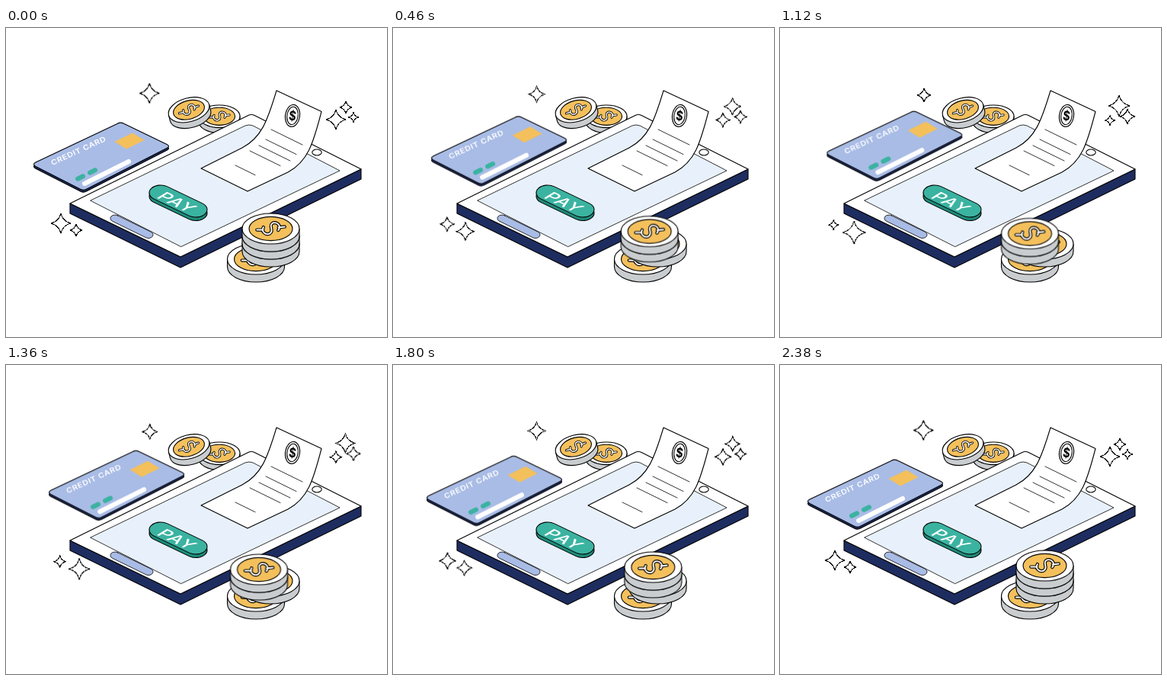
Recreate the animation shown at these times as an HTML page. Size 500 px wide and 405 px high, loop 2400 ms.

```html
<!DOCTYPE html>
<html lang="en">
<head>
<meta charset="utf-8">
<title>Mobile payment</title>
<style>
  html, body { margin: 0; width: 100%; height: 100%; overflow: hidden; background: #fff; }
  svg { display: block; width: 500px; height: 405px; }
  .ink { stroke: #000; stroke-width: 1.1; stroke-linejoin: round; stroke-linecap: round; }
  .thin .ink { stroke-width: .8; }
  .sparkle { fill: #fff; vector-effect: non-scaling-stroke; shape-rendering: crispEdges; }
  text { font-family: Inter, "Open Sans", sans-serif; font-weight: 600; fill: #fff; }
</style>
</head>
<body>
<svg id="stage" viewBox="0 0 500 405"></svg>
<script>
const NAVY = '#1e2d60', BLUE = '#a9bce6', GOLD = '#f3c05c', GREY = '#c9cdd0',
      TEAL = '#3bb3a1', DEEP_TEAL = '#1f8a79', SCREEN = '#e8f1fb';

const path = (d, fill = 'none') => `<path class="ink" d="${d}" fill="${fill}"/>`;
const ellipse = (x, y, rx, ry, fill = '#fff') =>
  `<ellipse class="ink" cx="${x}" cy="${y}" rx="${rx}" ry="${ry}" fill="${fill}"/>`;
const group = (body, attrs) => `<g ${attrs}>${body}</g>`;
const bar = (x1, y1, x2, y2, width, color) =>
  `<path d="M${x1} ${y1}L${x2} ${y2}" stroke="${color}" stroke-width="${width}" stroke-linecap="round"/>`;

// Outline around two equal ellipses joined by straight sides.
function pill(x1, y1, x2, y2, rx, ry, fill) {
  const u = (x2 - x1) / rx, v = (y2 - y1) / ry, len = Math.hypot(u, v);
  const dx = rx * v / len, dy = -ry * u / len;
  return path(`M${x1 + dx} ${y1 + dy}L${x2 + dx} ${y2 + dy}
    A${rx} ${ry} 0 0 1 ${x2 - dx} ${y2 - dy}L${x1 - dx} ${y1 - dy}
    A${rx} ${ry} 0 0 1 ${x1 + dx} ${y1 + dy}Z`, fill);
}

const DOLLAR = 'M-18 1.5L-10 1.5M-9.5 -2C-13 4 -6 9 -1 6C5 2 -4 -4 3 -7.5C9 -9 14 -3 9.5 2M10 -1.5L18 -2.5';
function dollar(scale) {
  const line = (w, c) => `<path d="${DOLLAR}" fill="none" stroke="${c}" stroke-width="${w}" stroke-linecap="round" stroke-linejoin="round"/>`;
  return group(line(4.2, '#000') + line(1.9, '#fff'), `transform="scale(${scale})"`);
}

function coin(x, y, rx, ry, depth, angle = 0) {
  const side = path(`M${-rx} 0v${depth}A${rx} ${ry} 0 0 0 ${rx} ${depth}v${-depth}Z`, GREY);
  const face = ellipse(0, 0, rx, ry) + ellipse(0, 0, rx * .76, ry * .78, GOLD);
  return group(side + face + dollar(rx / 37), `transform="translate(${x} ${y}) rotate(${angle})"`);
}
const bigCoin = (x, y) => coin(x, y, 37.5, 20, 10);

const CARD = 'M39 176L146 125.5Q150 123 154 125L211 152.5Q216 155 211 157.5L106 211Q102 213.5 98 211.5L39 181.5Q34 178.5 39 176Z';
const card =
  group(path(CARD, NAVY), 'transform="translate(0 2.8)"') + path(CARD, BLUE) +
  `<path d="M142.5 149L166 137.5L181.5 147L158 158.5Z" fill="${GOLD}"/>` +
  bar(94, 197.7, 101, 194.3, 6, TEAL) + bar(110, 189.7, 117, 186.3, 6, TEAL) +
  bar(103, 204, 161, 175, 6, '#fff') +
  '<text transform="matrix(.9 -.415 .38 .78 61 180.3)" font-size="10.8" letter-spacing=".6">CREDIT CARD</text>';

const phone =
  path('M84 230V243L229 314L466 198V185L229 300Z', NAVY) +
  path('M84 230L318 114.5Q322 112.5 326 114.5L466 185L229 300Z', '#fff') +
  group(
    path('M111 226L314 128Q319 126 324 128L438 187L230 286.5Z', SCREEN) +
    pill(143, 249.5, 187, 271, 6, 4.5, BLUE), 'class="thin"') +
  ellipse(408, 163, 6.2, 4);

const button =
  pill(203, 220.5, 249, 242.5, 15, 10, DEEP_TEAL) + pill(203, 216, 249, 238, 15, 10, TEAL) +
  '<text transform="matrix(.9 .43 -.75 .46 196.5 222)" font-size="24" letter-spacing="1" style="font-weight:500">PAY</text>';

const rows = [[348, 133, 41], [341, 146, 40], [332, 154, 41], [320, 161, 40], [301, 180, 26]];
const receipt =
  path('M355 82L414 109.5C403 152 396 175 370 189L317 214L256 184L310 157C335 144 343 122 355 82Z', '#fff') +
  group(rows.map(([x, y, w]) => path(`M${x} ${y}l${w} ${w * .49}`)).join(''), 'class="thin"') +
  group(ellipse(0, 0, 9.5, 14.5) + ellipse(0, 0, 7.2, 11.8) +
    '<text transform="scale(.85 1)" y="6" font-size="17" text-anchor="middle" style="fill:#000;font-weight:700">$</text>',
    'transform="translate(376 115) rotate(8)"');

// Each row: x, y, radius at rest, then x, y, radius at the far pose.
const sparkles = [
  [188.3, 85.5, 13, 189, 88, 9],
  [72, 256, 13, 70.3, 258, 6.5],
  [92, 265, 8, 97.3, 268, 15],
  [433, 120, 13, 433, 121, 6.5],
  [446, 104, 8, 445, 102, 14],
  [456, 117, 6.5, 456, 116, 10]
];
const star = '<path class="ink sparkle" d="M0 -1Q.2 -.2 1 0Q.2 .2 0 1Q-.2 .2 -1 0Q-.2 -.2 0 -1Z"/>';

const stage = document.getElementById('stage');
stage.innerHTML =
  coin(280, 115.8, 27, 14.8, 7) + coin(240, 107.3, 27.5, 15.5, 8, -15) +
  phone + button + receipt +
  group(card, 'id="card"') +
  bigCoin(328, 303) + bigCoin(347.5, 283) +
  group(bigCoin(347.5, 273) + bigCoin(347.5, 263), 'id="stack"') +
  star.repeat(sparkles.length);

// Eases out in both directions, with the turn at half time.
function swing(el, rest, far) {
  const easing = 'ease-out';
  el.animate(
    [{ transform: rest, easing }, { transform: far, easing }, { transform: rest }],
    { duration: 2400, iterations: Infinity }
  );
}
const pose = (x, y, r = 1) => `translate(${x}px, ${y}px) scale(${r})`;

swing(document.getElementById('card'), pose(0, 0), pose(25.5, -15));
swing(document.getElementById('stack'), pose(0, 0), pose(-19.7, 6.5));
stage.querySelectorAll('.sparkle').forEach((el, i) => {
  const s = sparkles[i];
  swing(el, pose(...s.slice(0, 3)), pose(...s.slice(3)));
});
</script>
</body>
</html>
```
